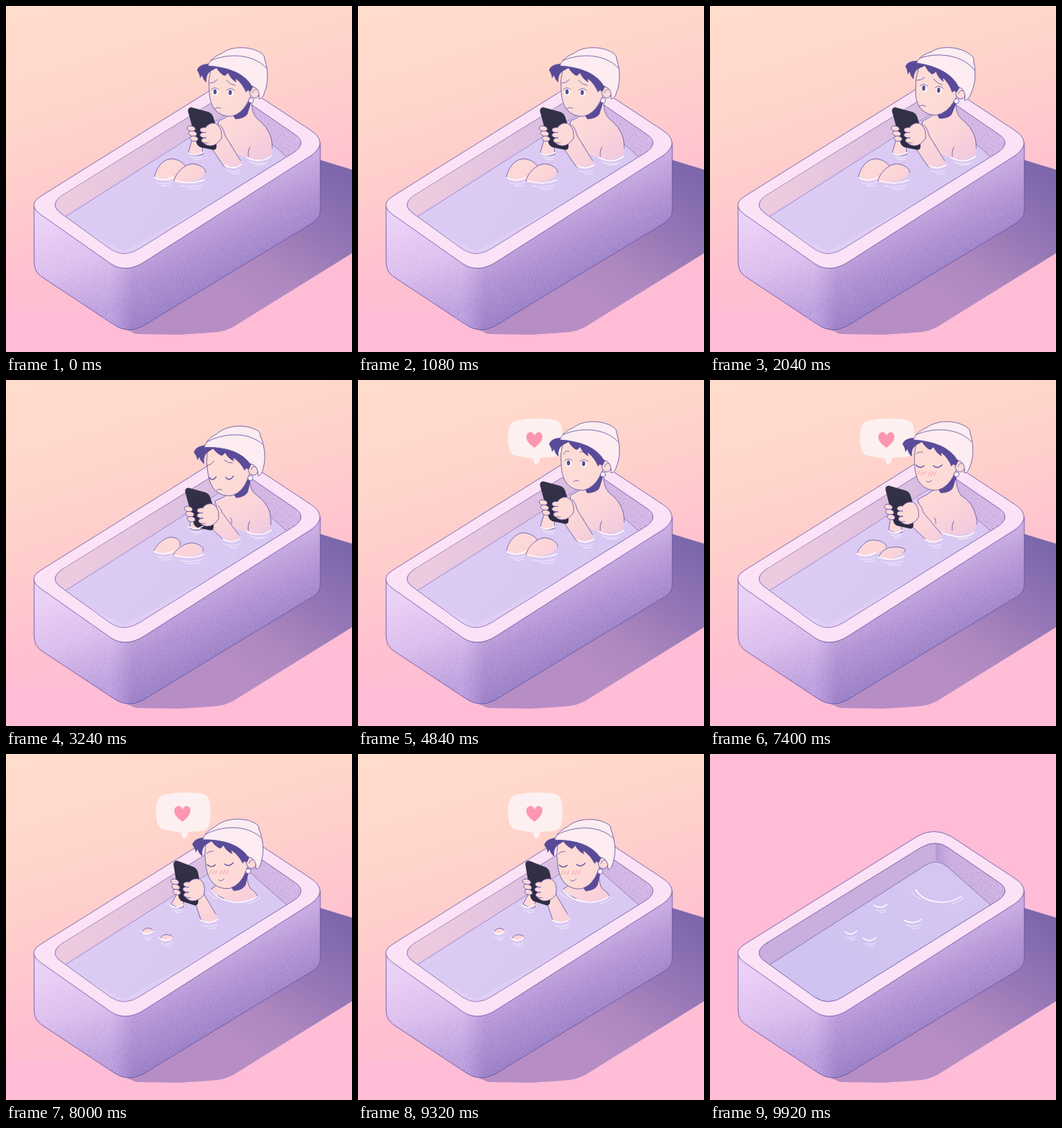
An HTML page for the animation above (9.96 s loop, 480x480 px).

```html
<!DOCTYPE html>
<html lang="en">
<head>
<meta charset="utf-8">
<title>Bath time</title>
<style>
html, body { margin: 0; width: 100%; height: 100%; overflow: hidden; background: #ffbcd7; }
#stage { position: relative; width: 480px; height: 480px; overflow: hidden; }
#glow { position: absolute; inset: 0 0 auto; height: 424px;
  background: linear-gradient(163deg, #ffddcd 0%, #ffd8cb 24%, #ffcdcc 46%, #ffc0d1 68%, #ffbcd700 96%); }
svg { position: absolute; left: 0; top: 0; width: 480px; height: 480px; }
#tub { will-change: transform; }
.line { fill: none; stroke: #5d4fa0; stroke-width: .8; stroke-linecap: round; stroke-linejoin: round; }
.lid { stroke-width: 1.3; }
.skin { fill: url(#skin); stroke: #5d4fa0; stroke-width: .8; stroke-linejoin: round; }
.hair { fill: #594b98; }
.hat { fill: #fdecf1; stroke: #5d4fa0; stroke-width: .8; stroke-linejoin: round; }
.wave { fill: none; stroke: #fff; stroke-linecap: round; }
.wave path { vector-effect: non-scaling-stroke; stroke-width: .8; opacity: .8; }
.wave .edge { stroke-width: 1.5; opacity: 1; }
</style>
</head>
<body>
<div id="stage">
<div id="glow"></div>

<svg id="tub" viewBox="0 0 480 480">
  <defs>
    <linearGradient id="shadow" gradientUnits="userSpaceOnUse" x1="465" y1="232" x2="345" y2="420">
      <stop offset="0" stop-color="#7d67ab"/><stop offset=".4" stop-color="#9577b5"/>
      <stop offset=".75" stop-color="#ae88c0"/><stop offset="1" stop-color="#b68dc4"/>
    </linearGradient>
    <linearGradient id="side" gradientUnits="userSpaceOnUse" x1="70" y1="290" x2="115" y2="430">
      <stop offset="0" stop-color="#ecd2f7"/><stop offset=".5" stop-color="#e0c4f1"/><stop offset="1" stop-color="#c4a8e3"/>
    </linearGradient>
    <linearGradient id="front" gradientUnits="userSpaceOnUse" x1="290" y1="275" x2="335" y2="365">
      <stop offset="0" stop-color="#ccb0e5"/><stop offset=".5" stop-color="#b799d7"/><stop offset="1" stop-color="#a389cc"/>
    </linearGradient>
    <linearGradient id="bend"><stop offset="0" stop-color="#000"/><stop offset=".09" stop-color="#fff"/></linearGradient>
    <linearGradient id="grainFront" gradientUnits="userSpaceOnUse" x1="290" y1="270" x2="340" y2="375">
      <stop offset="0" stop-opacity=".08"/><stop offset="1" stop-opacity=".3"/>
    </linearGradient>
    <linearGradient id="grainSide" gradientUnits="userSpaceOnUse" x1="80" y1="305" x2="120" y2="430">
      <stop offset="0" stop-opacity="0"/><stop offset="1" stop-opacity=".22"/>
    </linearGradient>
    <linearGradient id="grainWall" gradientUnits="userSpaceOnUse" x1="330" y1="135" x2="400" y2="200">
      <stop offset="0" stop-opacity=".05"/><stop offset="1" stop-opacity=".28"/>
    </linearGradient>
    <linearGradient id="water" gradientUnits="userSpaceOnUse" x1="290" y1="150" x2="190" y2="330">
      <stop offset="0" stop-color="#d5c6f1"/><stop offset="1" stop-color="#d0c3f1"/>
    </linearGradient>
    <linearGradient id="wall" gradientUnits="userSpaceOnUse" x1="313" y1="0" x2="410" y2="0">
      <stop offset="0" stop-color="#b79bd3"/><stop offset=".2" stop-color="#ceb1e2"/><stop offset="1" stop-color="#d8bde8"/>
    </linearGradient>
    <filter id="grain" x="0" y="0" width="100%" height="100%" color-interpolation-filters="sRGB">
      <feTurbulence type="fractalNoise" baseFrequency=".75" numOctaves="2" seed="4"/>
      <feColorMatrix values="0 0 0 0 .40  0 0 0 0 .30  0 0 0 0 .64  4 0 0 0 -1.8"/>
      <feComposite in2="SourceGraphic" operator="in"/>
    </filter>
    <mask id="bendMask"><rect x="145" width="335" height="480" fill="url(#bend)"/></mask>
    <path id="inner" d="M79,262 L292,130 Q314,117 332,131 L402,179 Q417,190 401,202 L186,336 Q165,350 146,338 L74,286 Q60,274 79,262Z"/>
    <path id="shell" d="M39,278 V355 Q39,369 50,376 L148,441 Q168,456 190,444 L425,301 Q436,294 436,284 V190 L163,340Z"/>
    <path id="frontFace" d="M145,340 V439 L148,441 Q168,456 190,444 L425,301 Q436,294 436,284 V190 L163,340Z"/>
    <path id="backWall" d="M313,118 V148 Q322,149 329,156 L388,208 L430,200 L340,110Z"/>
    <clipPath id="basin"><use href="#inner"/></clipPath>
  </defs>
  <path d="M434,213 L480,227 V343 L322,441 Q307,452 285,453 L240,456 L180,455 L160,446Z" fill="url(#shadow)"/>
  <use href="#shell" fill="url(#side)"/>
  <use href="#shell" fill="url(#grainSide)" filter="url(#grain)"/>
  <g mask="url(#bendMask)">
    <use href="#frontFace" fill="url(#front)"/>
    <use href="#frontFace" fill="url(#grainFront)" filter="url(#grain)"/>
  </g>
  <use href="#shell" class="line"/>
  <path d="M48,264 L288,114 Q310,101 334,114 L422,172 Q448,189 424,207 L192,355 Q167,371 146,358 L49,290 Q29,276 48,264Z" fill="#fce2f6" stroke="#5d4fa0" stroke-width=".8"/>
  <g clip-path="url(#basin)">
    <rect x="60" y="110" width="360" height="250" fill="#c9afde"/>
    <use href="#backWall" fill="url(#wall)"/>
    <use href="#backWall" fill="url(#grainWall)" filter="url(#grain)"/>
    <path d="M80,294 L298,155 Q314,144 329,156 L390,210 L200,360 L150,350Z" fill="url(#water)" stroke="#6a5bb2" stroke-width=".7"/>
  </g>
  <use href="#inner" class="line"/>
</svg>

<svg viewBox="0 0 480 480">
  <defs>
    <linearGradient id="skin" gradientUnits="userSpaceOnUse" x1="300" y1="130" x2="362" y2="215">
      <stop offset="0" stop-color="#fedcd6"/><stop offset=".5" stop-color="#fcd6d9"/><stop offset="1" stop-color="#f0c8df"/>
    </linearGradient>
    <linearGradient id="warm" gradientUnits="userSpaceOnUse" x1="90" y1="0" x2="300" y2="0">
      <stop offset="0" stop-color="#ffd5d8" stop-opacity=".55"/><stop offset="1" stop-color="#ffd5d8" stop-opacity=".15"/>
    </linearGradient>
    <linearGradient id="haze" gradientUnits="userSpaceOnUse" x1="60" y1="240" x2="340" y2="340">
      <stop offset="0" stop-color="#ffe6fc" stop-opacity=".3"/><stop offset="1" stop-color="#ffe0fa" stop-opacity=".1"/>
    </linearGradient>
    <linearGradient id="case" x2="0" y2="1">
      <stop offset="0" stop-color="#343249"/><stop offset="1" stop-color="#2d2b42"/>
    </linearGradient>
  </defs>
  <g id="person">
    <use href="#shell" fill="url(#haze)" clip-path="url(#basin)"/>
    <use href="#inner" fill="url(#haze)"/>
    <path d="M70,280 Q68,270 79,262 L292,130 Q302,124 313,124 V148 Q305,149 298,155 L82,291Z" fill="url(#warm)"/>
    <g id="bubble">
      <path d="M222,56 Q246,51 272,55 Q282,57 283,68 Q285,84 282,98 Q280,106 270,107 L253,108 Q251,117 247,118 Q244,116 243,109 L224,106 Q212,105 210,96 Q206,80 210,66 Q212,57 222,56Z" fill="#fdf0f1"/>
      <path d="M245,94 C236,88 232,82 234,76 C236,71 243,71 245,77 C248,70 255,71 256,78 C256,84 251,89 245,94Z" fill="#fd96ae"/>
    </g>
    <path id="armL" class="skin"/>
    <path id="torso" class="skin" pathLength="100" stroke-dasharray="29 36 35"/>
    <g id="creases"><path class="line" d="M338,196 Q335,202 336,209 M311,191 Q314,194 313,199"/></g>
    <path id="armR" class="skin" pathLength="100" stroke-dasharray="47 23 30"/>
    <path id="kneeL" class="skin" pathLength="100" stroke-dasharray="56 44"/>
    <path id="kneeR" class="skin" pathLength="100" stroke-dasharray="56 44"/>
    <g id="head">
      <path class="hair" d="M340,126 Q331,145 315,152 L318,157 Q330,157 335,150 L340,134Z"/>
      <path class="skin" d="M284,88 Q280,104 282,120 Q283,136 290,144 Q299,154 313,153 Q329,149 337,130 L346,112 L330,88 Q300,76 284,88Z"/>
      <ellipse class="skin" cx="345" cy="119" rx="7" ry="8.5"/>
      <path class="line" d="M342,120 Q344,114 348,116"/>
      <g id="eyes">
        <path fill="#fff6f4" d="M287,119 a4.500,5.500 0 1 1 9,0 a4.500,5.500 0 1 1 -9,0 M308,120 a4.500,5.500 0 1 1 9,0 a4.500,5.500 0 1 1 -9,0"/>
        <path class="line" d="M286,116 Q291,111 296,116 M307,117 Q312,112 318,117"/>
        <g class="hair"><ellipse cx="291" cy="119" rx="2.2" ry="3.6"/><ellipse cx="312" cy="120" rx="2.2" ry="3.6"/></g>
      </g>
      <path id="worried" class="line" d="M283,107 Q289,107 293,102 M306,103 Q311,109 318,110 M289,143 Q293,139 298,142"/>
      <path id="sad" class="line" d="M281,109 Q288,108 292,103 M306,103 Q311,108 317,108 M292,144 Q295,141 299,144"/>
      <path id="sadLids" class="line lid" d="M283,125 Q287,132 293,125 M306,127 Q311,134 317,126"/>
      <path id="calm" class="line" d="M285,103 Q288,97 293,99 M308,100 Q313,98 318,104 M299,141 Q302,138 306,140"/>
      <g id="happy">
        <path class="line" d="M284,103 Q287,99 293,100 M298,140 Q301,144 306,139"/>
        <path class="line lid" d="M284,118 Q289,124 295,119 M308,119 Q313,124 320,118"/>
        <path fill="none" stroke="#f58ea4" stroke-width=".9" d="M286,131 l3,-5 M290,132 l3,-5 M294,132 l3,-5 M301,133 l3,-6 M305,133 l3,-6 M309,133 l3,-6"/>
      </g>
      <path class="hair" d="M284,80 Q268,80 265,89 Q269,95 269,100 L272,96 Q273,102 278,106 Q277,96 283,91 L292,86 Q296,93 303,97 Q307,95 308,93 Q312,102 320,106 Q318,103 319,101 Q328,108 333,120 Q335,115 339,119 L345,108 Q320,80 284,80Z"/>
      <path class="hat" d="M280,83 C283,74 293,68 299,66 C312,55 340,55 355,66 Q359,68 359,74 C364,90 364,106 359,119 Q356,129 351,129 Q353,114 341,111 Q326,86 280,83Z"/>
      <path class="line" d="M284,76 C308,65 343,66 361,86"/>
      <circle cx="340" cy="131" r="3.5" fill="#fff4f6" stroke="#5d4fa0" stroke-width=".8"/>
    </g>
    <g id="phone">
      <path d="M252.500,146 Q252,141 257,140.500 L281,147 Q286,149 287.500,154 L292,168 L292,195 Q292,200 287,199.500 L270,196 Q265,194 264,189Z" fill="url(#case)"/>
      <g class="skin">
        <ellipse cx="257" cy="170" rx="5.800" ry="3.600" transform="rotate(12 257 170)"/>
        <ellipse cx="259" cy="177" rx="5.800" ry="3.600" transform="rotate(12 259 177)"/>
        <ellipse cx="261" cy="184" rx="5.500" ry="3.600" transform="rotate(12 261 184)"/>
        <path d="M277,168 Q283,161 291,163 Q298,167 299,176 L299,184 Q292,194 283,194 Q275,193 272,187Z"/>
        <ellipse cx="275" cy="172" rx="6" ry="3.600"/>
        <ellipse cx="275" cy="179" rx="6" ry="3.600"/>
        <ellipse cx="277" cy="186.500" rx="6" ry="3.600"/>
      </g>
      <path d="M277,169 L291,165 L297,178 L291,190 L278,189Z" fill="#fddad7"/>
    </g>
  </g>
  <g id="waves" class="wave">
    <g id="w0"></g><g id="w1"></g><g id="w2"></g><g id="w3"></g>
    <path id="neckline" class="edge"/><path id="neckA"/><path id="neckB"/>
  </g>
</svg>
</div>

<script>
const LOOP = 9960, END = 9920;
const $ = id => document.getElementById(id);

// A reading, B looking up, C dozing, D surprised, E leaning back, F sunk
const timeline = [[0, 'A'], [1080, 'A'], [1480, 'B'], [2120, 'B'], [2760, 'C'], [4280, 'C'],
  [4600, 'D'], [7160, 'D'], [7400, 'E'], [8000, 'F'], [LOOP, 'F']];

const tracks = [
  ['head', 'transform', {
    A: 'translate(0,0) rotate(0,340,131)', B: 'translate(2,1) rotate(5,340,131)',
    C: 'translate(-1,5) rotate(-5,340,131)', E: 'translate(2,0) rotate(0,340,131)',
    F: 'translate(-4,32) rotate(-4,340,131)' }],
  ['eyes', 'transform', { A: 'translate(-1,0)', B: 'translate(2,-2)', D: 'translate(1,-4)' }],
  ['phone', 'transform', {
    A: 'translate(0,0) rotate(0,253,143)', C: 'translate(-4,9) rotate(0,253,143)',
    E: 'translate(-9,6) rotate(1,253,143)', F: 'translate(-20,7) rotate(6,253,143)' }],
  ['torso', 'd', {
    A: 'M314,148 Q304,156 294,160 L300,196 L334,211 Q352,217 367,208 Q371,198 368,184 Q364,168 348,156 Q340,148 341,130',
    C: 'M312,156 Q302,163 290,168 L298,198 L333,211 Q350,217 366,208 Q369,198 366,184 Q362,170 348,160 Q338,154 338,138',
    E: 'M314,150 Q300,160 288,166 L298,198 L322,211 Q345,219 366,211 Q373,200 369,189 Q365,170 348,160 Q341,150 341,130',
    F: 'M294,180 Q291,184 285,187 L291,195 L305,202 Q330,208 349,198 Q348,195 346,193 Q344,190 339,187 Q334,180 334,165' }],
  ['armL', 'd', {
    A: 'M258,186 L253,203 Q262,209 273,206 L272,190', C: 'M256,194 L255,206 Q262,210 273,207 L270,198',
    E: 'M250,193 L248,208 Q256,213 267,211 L264,196', F: 'M238,192 L229,208 Q236,214 245,213 L247,200' }],
  ['armR', 'd', {
    A: 'M297,165 Q303,172 304,180 L327,217 Q325,224 314,225 Q305,225 302,222 L283,194',
    C: 'M294,174 Q298,178 300,184 L324,216 Q322,224 312,225 Q304,225 301,221 L280,201',
    E: 'M289,170 Q294,176 296,184 L322,215 Q320,223 311,225 Q302,225 299,221 L276,199',
    F: 'M264,180 Q270,186 274,194 L293,226 Q292,233 283,234 Q273,234 270,230 L262,206' }],
  ['kneeL', 'd', {
    A: 'M206,237 C208,226 217,213 228,212 C238,212 247,217 250,224 C246,234 240,241 232,242 C220,242 212,240 206,237',
    C: 'M205,237 C208,230 218,219 228,218 C236,218 241,222 242,226 C240,234 236,240 230,241 C220,241 210,240 205,237',
    E: 'M204,241 C207,232 216,222 226,222 C236,222 243,226 245,231 C240,236 236,240 230,241 C220,243 210,243 204,241',
    F: 'M188,249 C189,244 194,241 198,242 C201,242 203,244 203,246 C202,248 198,250 195,250 C192,251 190,250 188,249' }],
  ['kneeR', 'd', {
    A: 'M233,243 C234,234 246,220 258,219 C268,219 276,225 277,230 C276,238 262,244 250,245 C242,246 236,245 233,243',
    C: 'M232,243 C235,236 246,227 256,226 C266,226 273,231 274,236 C272,241 262,245 250,246 C242,247 236,245 232,243',
    E: 'M234,245 C238,238 244,233 252,232 C262,231 270,233 271,236 C268,242 258,247 250,248 C242,249 237,248 234,245',
    F: 'M213,257 C215,253 219,250 224,251 C228,251 231,253 231,255 C230,257 226,259 222,259 C218,260 215,259 213,257' }],
  ['w0', 'transform', { A: 'translate(219,241) scale(1.3,1)', E: 'translate(217,243) scale(1.3,1)', F: 'translate(196,249) scale(.8,1)' }],
  ['w1', 'transform', { A: 'translate(255,245) scale(2,1)', C: 'translate(254,246) scale(2,1)', E: 'translate(252,248) scale(1.8,1)', F: 'translate(222,258) scale(.9,1)' }],
  ['w2', 'transform', { A: 'translate(315,224) scale(1.2,1)', C: 'translate(313,224) scale(1.2,1)', E: 'translate(311,224) scale(1.2,1)', F: 'translate(282,233) scale(1.2,1)' }],
  ['w3', 'transform', { A: 'translate(263,206) scale(1,.8)', E: 'translate(258,211) scale(1,.8)', F: 'translate(237,212) scale(.9,.9)' }],
  ['neckline', 'd', { A: 'M334,210 C342,215 358,217 368,208', E: 'M322,211 C336,217 356,220 367,211', F: 'M286,188 C297,206 330,211 349,197' }],
  ['neckA', 'd', { A: 'M338,216 Q348,220 358,218', F: 'M280,191 Q284,197 292,200' }],
  ['neckB', 'd', { A: 'M345,220 Q354,222 362,217', F: 'M337,207 Q346,206 353,198' }],
  ['creases', 'opacity', { A: '1', F: '0' }]
];

for (let i = 0; i < 4; i++)
  $('w' + i).innerHTML = '<path class="edge" d="M-10,-3 Q0,4 10,-4"/><path d="M-7,4 Q1,8 9,3"/><path d="M-2,8 Q4,10 8,7"/>';

const ease = k => k * k * (3 - 2 * k);
const pose = (set, p) => set[p] || (p === 'F' && set.E) || set.A;

function mix(a, b, k) {
  const to = b.match(/-?[\d.]+/g);
  let i = 0;
  return a.replace(/-?[\d.]+/g, n => (+n + (to[i++] - n) * k).toFixed(2));
}

function ramp(t, keys) {
  const i = Math.max(1, keys.findIndex(k => k[0] > t));
  const [t0, a] = keys[i - 1], [t1, b] = keys[i];
  return [a, b, ease((t - t0) / (t1 - t0))];
}

const popKeys = [[0, 0], [4320, 0], [4560, 1.2], [4720, .96], [4840, 1], [5160, 1], [5400, 1.08], [5640, 1], [LOOP, 1]];
const jitter = ['0,0', '.6,.4', '-.6,.5'];
const show = (id, on) => { $(id).style.visibility = on ? 'inherit' : 'hidden'; };

function draw(time) {
  const step = time > 7160 && time < 8000 ? 40 : 80;
  const t = time >= END ? END : Math.max(0, Math.floor((time - 40) / step) * step + 40);
  const [a, b, k] = ramp(t, timeline);
  for (const [id, attr, set] of tracks) $(id).setAttribute(attr, mix(pose(set, a), pose(set, b), k));

  const [s0, s1, sk] = ramp(t, popKeys);
  const s = s0 + (s1 - s0) * sk;
  $('bubble').setAttribute('transform', `translate(247,118) scale(${s}) translate(-247,-118)`);
  $('waves').setAttribute('transform', `translate(${jitter[Math.floor((t + 120) / 160) % 3]})`);

  const mood = t < 2360 ? 'worried' : t < 4360 ? 'sad' : t < 6440 ? 'calm' : 'happy';
  for (const m of ['worried', 'sad', 'calm', 'happy']) show(m, m === mood);
  show('sadLids', mood === 'sad');
  show('eyes', mood === 'worried' || mood === 'calm');
  show('person', t < END);
  show('glow', t < END);
}

const start = performance.now();
function tick() {
  draw((performance.now() - start) % LOOP);
  requestAnimationFrame(tick);
}
tick();
</script>
</body>
</html>
```
